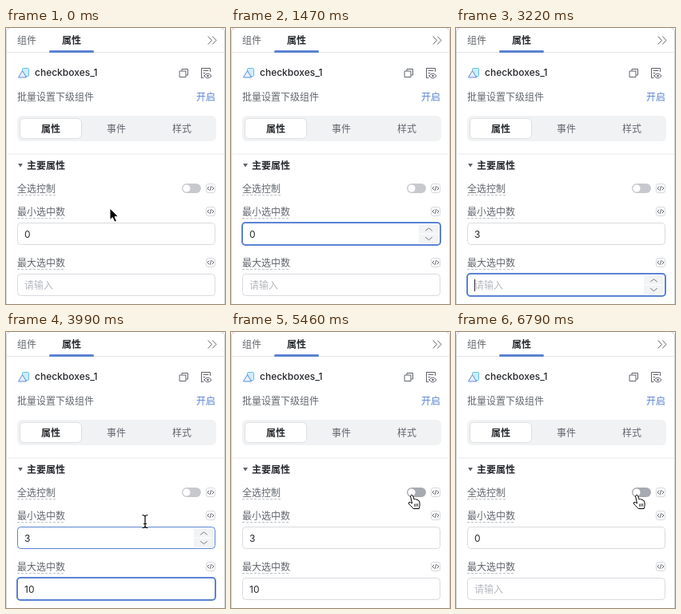
Write an HTML page that moves like this. It is 274x346 px and loops after 7.49 s.

```html
<!DOCTYPE html>
<html lang="zh-CN">
<head>
<meta charset="utf-8">
<style>
html, body { margin: 0; width: 100%; height: 100%; overflow: hidden; background: #fff; }
svg { display: block; width: 274px; height: 346px; }
text { font: 12px Inter, "Noto Sans CJK SC", "Noto Sans CJK", sans-serif; fill: #62666d; }
.dark { fill: #24272c; }
.bold { font-weight: 600; fill: #24272c; }
.blue { fill: #5b82d3; }
.hint { fill: #b4b7bd; }
.line { fill: none; stroke: #5f636b; stroke-linecap: round; stroke-linejoin: round; }
</style>
</head>
<body>
<svg id="stage" viewBox="0 0 274 346"></svg>
<script>
const LOOP = 7490, STEP = 70, BLUE = '#5b82d3';
const stage = document.getElementById('stage');

const text = (x, y, s, cls = '', anchor = 'start') =>
  `<text x="${x}" y="${y}" class="${cls}" text-anchor="${anchor}">${s}</text>`;
const rect = (x, y, w, h, r, fill, stroke = 'none', more = '') =>
  `<rect x="${x}" y="${y}" width="${w}" height="${h}" rx="${r}" fill="${fill}" stroke="${stroke}" ${more}/>`;
const line = (d, more = '') => `<path class="line" d="${d}" ${more}/>`;

const codeIcon = y => rect(250.5, y - 5.5, 11, 11, 2.5, '#fff', '#d6d8dc') +
  line(`M254 ${y - 2}l-2 2l2 2M258 ${y - 2}l2 2l-2 2M256.7 ${y - 2.5}l-1.4 5`);
const label = (y, s) => text(14, y + 4.5, s) +
  line(`M14 ${y + 8.5}h${s.length * 12}`, 'style="stroke:#bcbfc4;stroke-linecap:butt" stroke-dasharray="3 2"') +
  codeIcon(y);

const panel =
  rect(0, 0, 274, 346, 0, '#fff') +
  line('M.5 346V4Q.5 .5 4 .5M270 .5Q273.5 .5 273.5 4V346', 'style="stroke:#d2d4d7"') +
  line('M1 30.5H273', 'style="stroke:#e4e6e9"') +
  text(14, 19.5, '组件') + text(70, 19.5, '属性', 'bold') +
  rect(54, 28, 56, 3, 1.5, BLUE) +
  line('M253 10.8l4.5 4.7l-4.5 4.7M258.5 10.8l4.5 4.7l-4.5 4.7') +
  rect(20.5, 50.5, 8, 10, 1, '#cdeefa', '#62c0e0') +
  '<path d="M20.5 53.5L25.5 62H15.5Z" fill="#e8f0ff" stroke="#5b8be0" stroke-linejoin="round"/>' +
  text(36, 60.2, 'checkboxes_1', 'dark" style="font-weight:500') +
  line('M220 53.5V51.5H227.5V59H225.5M217.5 54h7.5v7.5h-7.5z') +
  line('M247 62.5H244.5V50.5H255.5V54.5M247 53.5h6M247 56.5h2M248 60Q252.5 54 257 60Q252.5 66 248 60Z') +
  '<circle cx="252.5" cy="60" r="1.3" fill="#5f636b"/>' +
  text(14, 90.5, '批量设置下级组件') + text(262, 90.5, '开启', 'blue', 'end') +
  rect(14, 110, 249, 32, 6, '#f1f2f4') +
  rect(17.5, 113.5, 77, 25, 5, '#fff', '#dddfe2') +
  text(56, 130.5, '属性', 'bold', 'middle') +
  text(138, 130.5, '事件', '', 'middle') + text(220, 130.5, '样式', '', 'middle') +
  line('M1 158H273', 'style="stroke:#e8eaec"') +
  '<path d="M15 170h6l-3 4.5z" fill="#5f636b"/>' +
  text(26, 176.5, '主要属性', 'bold') +
  label(201, '全选控制') + label(230, '最小选中数') + label(294, '最大选中数');

function toggle(on, hover) {
  const grey = hover ? [168, 170, 178] : [200, 201, 207];
  const fill = grey.map((v, i) => v + ([91, 130, 211][i] - v) * on);
  return rect(220, 195, 24, 12, 6, `rgb(${fill})`) +
    `<circle cx="${226 + 12 * on}" cy="201" r="4.6" fill="#fff"/>`;
}

function field(y, value, focus, hover, caret) {
  let s = focus
    ? rect(14, y, 248, 28, 4, '#fff', BLUE, 'stroke-width="2"')
    : rect(14.5, y + .5, 247, 27, 4, '#fff', hover ? BLUE : '#d9dbdf');
  if (hover) s += rect(235, y + 2, 25, 24, 2, '#f2f3f5') +
    line(`M235 ${y + 14}h25`, 'style="stroke:#fff"') +
    line(`M243.5 ${y + 10}l4 -3.2l4 3.2M243.5 ${y + 18.5}l4 3.2l4 -3.2`, 'style="stroke:#757981"');
  s += text(23, y + 18.6, value || '请输入', value ? 'dark' : 'hint');
  if (caret) s += rect(23 + value.length * 6.6, y + 7, 1, 15, 0, '#24272c');
  return s;
}

const pointers = {
  arrow: '<path d="M0 0V14.5L3.3 11.5L5.8 17.2L8.4 16L6 10.6H10.6Z" fill="#000" stroke="#fff"/>',
  beam: ['#fff" stroke-width="2.4', '#000" stroke-width="1.2'].map(c =>
    `<path d="M-3.5 -8Q0 -8 0 -6Q0 -8 3.5 -8M0 -6V6M-3.5 8Q0 8 0 6Q0 8 3.5 8M-2 3H2" fill="none" stroke="${c}"/>`).join(''),
  hand: '<path d="M-3.6 -6.5Q-2 -9 -.5 -6.8L1.2 -2Q2.8 -3.6 3.8 -1.8Q5.2 -2.8 6 -.8Q7.4 -1.2 7.8 1L8.2 4Q8.2 6.5 7.2 9.5H.2Q-1.5 7.5 -3.5 5.5L-5.8 3Q-6 .8 -3.6 1.6L-1.4 2.8Z" fill="#fff" stroke="#000" stroke-linejoin="round"/>' +
    '<path d="M1.4 3.5l.5 3.5M3.4 3.2l.4 3.5M5.4 3l.3 3.5" stroke="#000" stroke-width=".8"/>',
  none: ''
};

// time, x, y, pointer shape until the next point
const path = [
  [0, 130, 226, 'arrow'], [140, 130, 226, 'arrow'], [490, 108, 238, 'arrow'],
  [560, 101, 246, 'beam'], [840, 82, 255, 'beam'], [980, 84, 254, 'beam'],
  [1470, 84, 254, 'none'], [2030, 84, 254, 'beam'], [2520, 71, 313, 'beam'],
  [3220, 71, 313, 'none'], [3850, 71, 313, 'beam'], [3990, 174, 237.5, 'beam'],
  [4060, 188, 222, 'arrow'], [4550, 192, 214, 'arrow'], [4830, 197, 221, 'arrow'],
  [5110, 218, 208, 'arrow'], [5250, 226, 211, 'hand'], [5320, 228, 212, 'hand'],
  [LOOP, 228, 212, 'hand']
];

function pointer(t) {
  const i = path.findIndex(p => p[0] > t);
  const [t0, x0, y0, kind] = path[i - 1], [t1, x1, y1] = path[i];
  const k = (t - t0) / (t1 - t0);
  return `<g transform="translate(${x0 + (x1 - x0) * k} ${y0 + (y1 - y0) * k})">${pointers[kind]}</g>`;
}

const within = (t, a, b) => t >= a && t < b;
const ramp = (t, a) => {
  const k = Math.min(1, Math.max(0, (t - a) / 210));
  return k * k * (3 - 2 * k);
};

function draw(t) {
  const min = t < 1540 ? '0' : t < 1750 ? '' : t < 5530 ? '3' : '0';
  const max = t < 3290 ? '' : t < 3430 ? '1' : t < 5530 ? '10' : '';
  stage.innerHTML = panel +
    toggle(ramp(t, 5460) - ramp(t, 6370), t >= 5250) +
    field(244, min, within(t, 700, 2800), within(t, 560, 2240) || within(t, 3920, 4060),
      within(t, 910, 1260) || within(t, 1540, 1820)) +
    field(308, max, within(t, 2800, 4620), within(t, 2450, 3920), within(t, 2870, 3430)) +
    pointer(t);
}

const start = performance.now();
let last = -1;
function tick() {
  const t = Math.floor((performance.now() - start) % LOOP / STEP) * STEP;
  if (t !== last) draw(last = t);
  requestAnimationFrame(tick);
}
tick();
</script>
</body>
</html>
```
